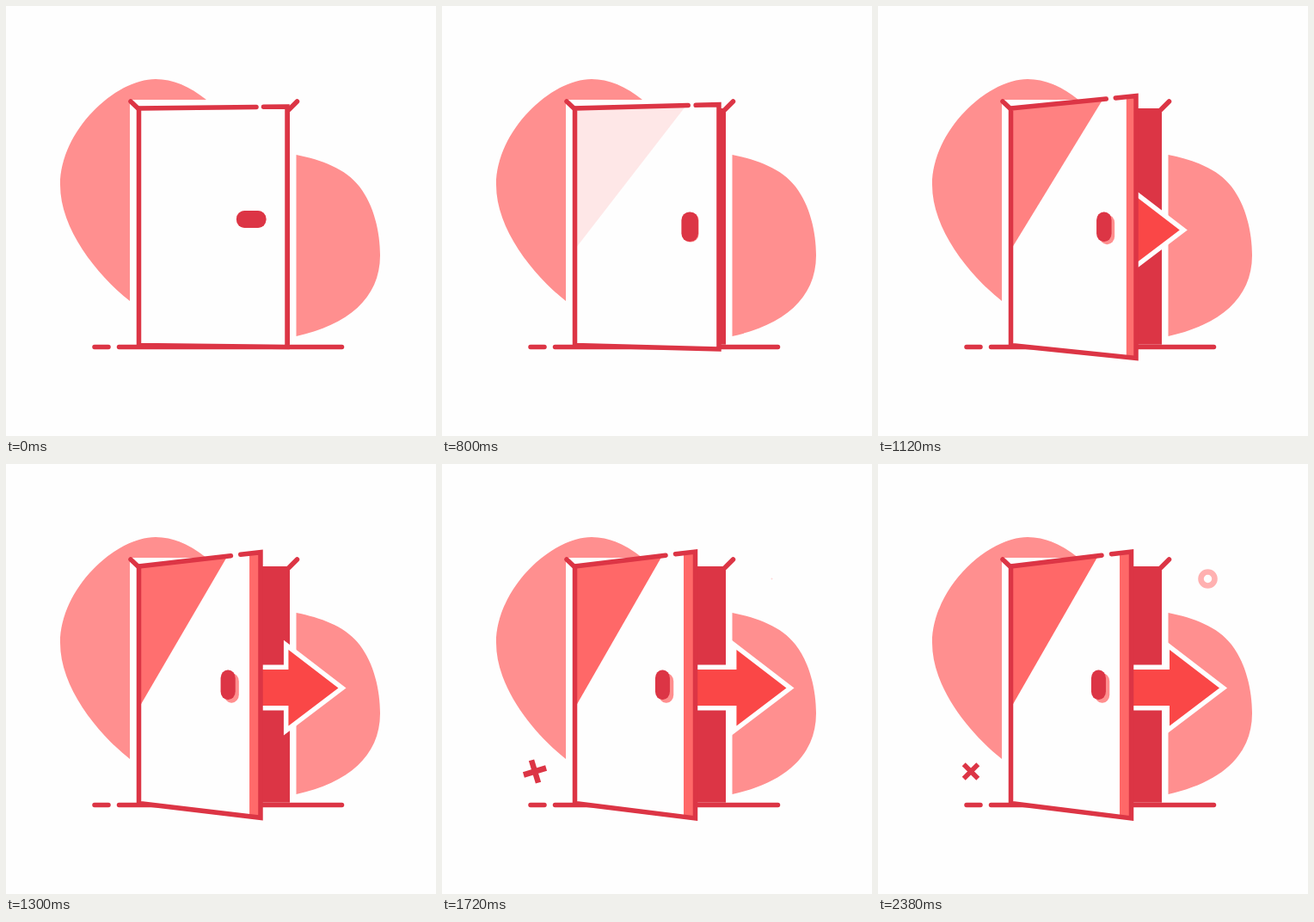
Recreate the animation shown at these times as an HTML page. Size 500 px wide and 500 px high, loop 2.42 s.

```html
<!DOCTYPE html>
<html lang="en">
<head>
<meta charset="utf-8">
<title>Opening door</title>
<style>
  html, body { margin: 0; width: 100%; height: 100%; overflow: hidden; background: #fefefe; }
  svg { display: block; width: 100vw; height: 100vh; }
  .line { fill: none; stroke: #dc3545; stroke-width: 5.5; stroke-linecap: round; }
</style>
</head>
<body>
<svg viewBox="0 0 500 500">
  <g fill="#ff8f8f">
    <path d="M144 343C105 312 63 259 63 208C63 145 127 85 174 85C194 85 213 93 233 109H144Z"/>
    <path d="M337.5 173C367 179 395 189 411 210C428 232 435 263 435 290C435 340 397 371 337.5 384Z"/>
  </g>
  <path class="line" d="M103 396.5H119M131.5 396.5H390.5"/>
  <rect x="290" y="119" width="40" height="274.7" fill="#dc3545"/>
  <path id="arrow" d="M-130 239H-58V216L0 260.5L-58 304.5V281H-130Z"
        fill="#fa4747" stroke="#fefefe" stroke-width="11" paint-order="stroke"/>
  <path id="panel" fill="#fefefe"/>
  <path id="glass" fill="#ff6868"/>
  <path id="side"/>
  <path id="frame" class="line"/>
  <path class="line" d="M145 111L154 119.5M338.5 111L329 120.5"/>
  <rect id="shade" x="-26" y="-10" width="34.5" height="20" rx="9.5" fill="#ff8f8f"/>
  <rect id="handle" x="-26" y="-10" width="34.5" height="20" rx="9.5" fill="#dc3545"/>
  <path id="cross" d="M-11.7 0H11.7M0 -11.7V11.7" stroke="#dc3545" stroke-width="5.6"/>
  <circle id="ring" r="8" fill="none" stroke="#ffb1b1" stroke-width="6.6"/>
</svg>
<script>
const LOOP = 2420;
const $ = id => document.getElementById(id);
const set = (id, name, value) => $(id).setAttribute(name, value);
const mix = (a, b, k) => a + (b - a) * k;
const span = (t, from, to) => Math.min(1, Math.max(0, (t - from) / (to - from)));
const sine = x => (1 - Math.cos(Math.PI * x)) / 2;

// cubic-bezier(.4, 0, .2, 1), solved by bisection
function ease(x) {
  if (x <= 0 || x >= 1) return x;
  let lo = 0, hi = 1, s;
  for (let i = 0; i < 24; i++) {
    s = (lo + hi) / 2;
    const at = 1.2 * s * (1 - s) ** 2 + 0.6 * s * s * (1 - s) + s ** 3;
    if (at < x) lo = s; else hi = s;
  }
  return s * s * (3 - 2 * s);
}

// Grow past full size, then settle
function pop(t, start, peak, end) {
  return t < peak ? 1.17 * ease(span(t, start, peak)) : mix(1.17, 1, sine(span(t, peak, end)));
}

function drawDoor(p) {
  const left = 154.5, top = 119, bottom = 394.5;
  const right = mix(327, 294.5, p);
  const rTop = mix(117, 102, p), rBottom = mix(396.5, 412, p);
  const upper = x => `${x} ${mix(top, rTop, (x - left) / (right - left))}`;
  const lower = x => `${x} ${mix(bottom, rBottom, (x - left) / (right - left))}`;
  const inner = mix(327, 281, p);

  set('panel', 'd', `M${upper(left)}L${upper(right)}L${lower(right)}L${lower(left)}Z`);
  set('glass', 'd', `M${upper(left)}L${upper(mix(289, 256, p))}L156 281L${left} 281Z`);
  set('glass', 'opacity', p);
  set('side', 'd', `M${upper(inner)}L${upper(right)}L${lower(right)}L${lower(inner)}Z`);
  const tint = Math.round(mix(144, 104, p));
  set('side', 'fill', `rgb(255,${tint},${tint})`);
  set('frame', 'd', `M${upper(mix(299.5, 271.5, p))}L${upper(right)}L${lower(right)}` +
    `L${lower(left)}L${upper(left)}L${upper(mix(291, 260, p))}`);
}

function drawHandle(turn, p) {
  const place = (id, dx, dy) => set(id, 'transform',
    `translate(${293.95 - 37.5 * p + dx} ${248 + dy}) scale(${1 - 0.15 * p} 1) rotate(${-90 * turn})`);
  place('shade', 4.3 * p, 3.8 * p);
  place('handle', 0, 0);
}

function arrowTip(t) {
  const rest = Math.max(0, 1600 - t) / 300;
  return Math.max(230, 402.3 - 16 * rest ** 2.5) - 5.3 * sine(span(t, 1600, 1900));
}

function render(t) {
  const open = ease(span(t, 600, 1550));
  drawDoor(open);
  drawHandle(ease(span(t, 100, 600)), open);
  set('arrow', 'transform', `translate(${arrowTip(t)} 0)`);
  set('arrow', 'visibility', t < 850 ? 'hidden' : 'visible');
  set('cross', 'transform', `translate(108 357.5) rotate(${-45 * sine(span(t, 1300, 2300))}) ` +
    `scale(${pop(t, 1400, 1720, 2380)})`);
  set('ring', 'transform', `translate(383.5 133.5) scale(${pop(t, 1670, 2020, 2380)})`);
}

const start = performance.now();
function tick() {
  render((performance.now() - start) % LOOP);
  requestAnimationFrame(tick);
}
tick();
</script>
</body>
</html>
```
